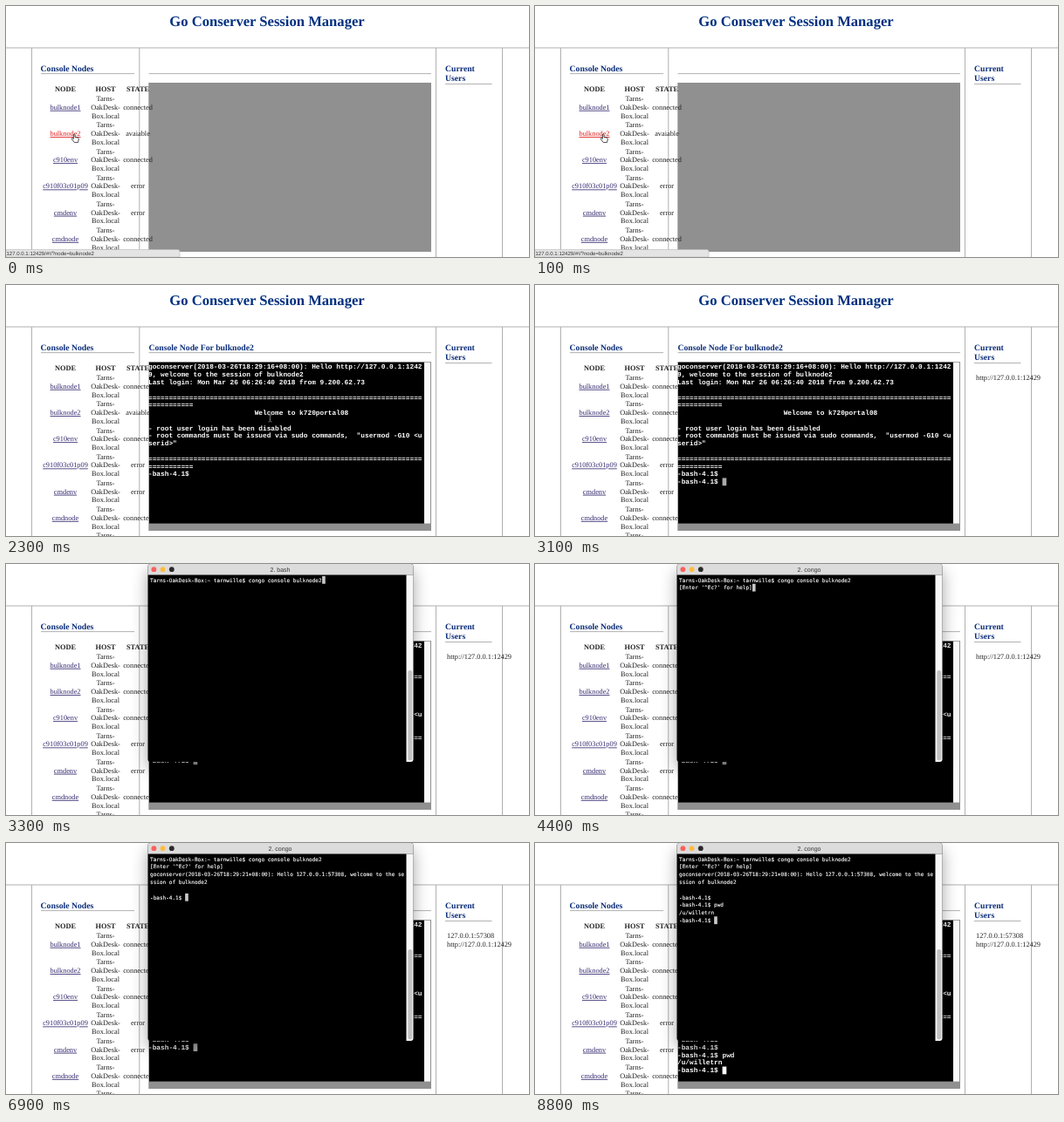
An HTML page that plays this animation: 599 px wide and 288 px high, repeating every 8900 ms.

```html
<!DOCTYPE html>
<html lang="en">
<head>
<meta charset="utf-8">
<title>Go Conserver Session Manager</title>
<style>
  html, body { margin: 0; width: 100%; height: 100%; overflow: hidden; background: #fff; }
  svg { display: block; width: 599px; height: 288px; }
  text { white-space: pre; text-rendering: geometricPrecision; }
  .page { font: 8.3px "Liberation Serif", serif; fill: #222; }
  .bold { font-weight: bold; }
  .head { font: bold 9.72px "Liberation Serif", serif; fill: #0a2c78; }
  .title { font: bold 16.63px "Liberation Serif", serif; fill: #003080; }
  .link { fill: #35296f; text-decoration: underline; }
  .web { font: bold 7.815px "Liberation Mono", monospace; fill: #fff; }
  .tty { font: 6.06px "DejaVu Sans Mono", monospace; fill: #fff; stroke: #fff; stroke-width: .12px; }
  .ui { font: 6.05px "Liberation Sans", sans-serif; fill: #333; }
  .mid { text-anchor: middle; }
  .win { filter: drop-shadow(0 8px 9px rgba(0, 0, 0, .36)); }
</style>
</head>
<body>
<script>
const LOOP = 8900;
const NS = "http://www.w3.org/2000/svg";

function add(parent, tag, attrs = {}, text) {
  const el = document.createElementNS(NS, tag);
  for (const k in attrs) el.setAttribute(k, attrs[k]);
  if (text !== undefined) el.textContent = text;
  parent.append(el);
  return el;
}
const rect = (p, x, y, width, height, fill) => add(p, "rect", { x, y, width, height, fill });
const label = (p, cls, x, y, s) => add(p, "text", { class: cls, x, y }, s);
const group = (p, cls = "") => add(p, "g", { class: cls });
const show = (el, on) => el.setAttribute("visibility", on ? "visible" : "hidden");

const svg = add(document.body, "svg", { viewBox: "0 0 599 288" });
rect(svg, 0, 0, 599, 288, "#fff");

// Page frame
rect(svg, 0, 47.5, 599, 1, "#b0b0b0");
for (const x of [29, 152.3, 492, 568]) rect(svg, x, 48, 1, 240, "#b0b0b0");
label(svg, "title mid", 299, 23, "Go Conserver Session Manager");
label(svg, "head", 39.6, 75, "Console Nodes");
const nodeHead = label(svg, "head", 163.4, 75, "Console Node For bulknode2");
label(svg, "head", 503, 75, "Current");
label(svg, "head", 503, 86.3, "Users");
rect(svg, 40, 77.2, 107, 0.9, "#aaa");
rect(svg, 163.5, 77.2, 323.5, 0.9, "#aaa");
rect(svg, 503, 89, 53.5, 0.9, "#aaa");
rect(svg, 163.3, 88, 323.7, 194, "#909090");

// Node table
[["NODE", 68], ["HOST", 114], ["STATE", 151]].forEach(([s, x]) => label(svg, "page bold mid", x, 98, s));
const rows = [
  ["bulknode1", "connected"], ["bulknode2", "avaiable"], ["c910env", "connected"],
  ["c910f03c01p09", "error"], ["cmdenv", "error"], ["cmdnode", "connected"], ["", ""]
].map(([name, state], i) => {
  const y = 118.8 + i * 30.22;
  ["Tarns-", "OakDesk-", "Box.local"].forEach((s, k) => label(svg, "page mid", 114, y + (k - 1) * 9.7, s));
  return {
    link: label(svg, "page link mid", 68, y, name),
    state: label(svg, "page mid", 151, y, state)
  };
});
const users = [109, 119.2].map(y => label(svg, "page", 505, y, ""));

// Browser console
const consoleBox = group(svg);
rect(consoleBox, 164, 88.8, 315, 184.8, "#000");
rect(consoleBox, 479, 88.8, 7, 184.8, "#fafafa");

// Rows of text plus a block cursor; log entries are [time, line, text]
function terminal(parent, cls, x, y, pitch, cw, log, cursorFrom) {
  const count = Math.max(...log.map(e => e[1])) + 1;
  const cursor = rect(parent, 0, 0, cw, pitch, "#c8c8c8");
  const lines = Array.from({ length: count }, (_, i) => label(parent, cls, x, y + i * pitch, ""));
  return t => {
    const now = Array(count).fill("");
    let last = 0;
    for (const [at, n, s] of log) if (t >= at) {
      now[n] = s;
      last = n;
    }
    now.forEach((s, i) => { if (lines[i].textContent !== s) lines[i].textContent = s; });
    cursor.setAttribute("x", x + now[last].length * cw);
    cursor.setAttribute("y", y + last * pitch - pitch * 0.76);
    show(cursor, t >= cursorFrom);
    return cursor;
  };
}

const PROMPT = "-bash-4.1$ ";
const shell = n => [
  [6400, n, PROMPT], [7200, n + 1, PROMPT],
  [7500, n + 1, PROMPT + "p"], [7700, n + 1, PROMPT + "pw"], [7900, n + 1, PROMPT + "pwd"],
  [8400, n + 2, "/u/willetrn"], [8400, n + 3, PROMPT]
];
const webLog = [
  [1500, 0, "goconserver(2018-03-26T18:29:16+08:00): Hello http://127.0.0.1:1242"],
  [1500, 1, "9, welcome to the session of bulknode2"],
  [1800, 2, "Last login: Mon Mar 26 06:26:40 2018 from 9.200.62.73"],
  [1800, 4, "=".repeat(67)],
  [1800, 5, "=".repeat(11)],
  [1800, 6, " ".repeat(26) + "Welcome to k720portal08"],
  [1800, 8, "- root user login has been disabled"],
  [1800, 9, "- root commands must be issued via sudo commands,  \"usermod -G10 <u"],
  [1800, 10, "serid>\""],
  [1800, 12, "=".repeat(67)],
  [1800, 13, "=".repeat(11)],
  [1900, 14, PROMPT], [2600, 15, PROMPT],
  ...shell(16)
];
const ttyLog = [
  [3300, 0, "Tarns-OakDesk-Box:~ tarnwille$ congo console bulknode2"],
  [4400, 1, "[Enter '^Ec?' for help]"],
  [4600, 2, "goconserver(2018-03-26T18:29:21+08:00): Hello 127.0.0.1:57308, welcome to the se"],
  [4600, 3, "ssion of bulknode2"],
  [4600, 4, ""],
  ...shell(5)
];
const drawWeb = terminal(consoleBox, "web", 163, 96.4, 8.78, 4.69, webLog, 2600);

// Desktop terminal window
const win = group(svg);
const frame = group(win, "win");
add(frame, "path", { d: "M162.5 3q0-3 3-3h298q3 0 3 3v221q0 3-3 3h-298q-3 0-3-3z", fill: "#000" });
add(win, "path", { d: "M162.5 12.5V3q0-3 3-3h298q3 0 3 3v9.5z", fill: "#dcdcdc" });
add(win, "path", { d: "M458.5 12.5h8v211.5q0 3-3 3h-5z", fill: "#f7f7f7" });
add(win, "rect", { x: 460.3, y: 122, width: 5, height: 103.5, rx: 2.5, fill: "#c2c2c2" });
["#fc605b", "#fdbc40", "#2a2a2a"].forEach((fill, i) => add(win, "circle", { cx: 169.4 + i * 10.2, cy: 6.2, r: 2.9, fill }));
const winTitle = label(win, "ui mid", 314, 8.6, "2. bash");
winTitle.style.fontSize = "7px";
const drawTty = terminal(win, "tty", 165, 20.6, 8.8, 3.65, ttyLog, 3300);

// Link preview bar
const status = group(svg);
add(status, "path", { d: "M0 279.5h196.5q2.5 0 2.5 2.5v6H0z", fill: "#e4e4e4", stroke: "#bbb", "stroke-width": 0.6 });
label(status, "ui", 0.5, 286, "127.0.0.1:12429/#!/?node=bulknode2");

// Pointers
const hand = add(svg, "path", {
  d: "M-1.6-4.6q.9-.9 1.6 0v3l3.4.8q1.1.4.9 1.6l-.8 3.8h-4.2l-3-4q-.3-1.2.9-1l1.2.8z",
  fill: "#fff", stroke: "#222", "stroke-width": 0.8
});
const beam = add(svg, "path", {
  d: "M-2-4Q0-4 0-3Q0-4 2-4M-2 4Q0 4 0 3Q0 4 2 4M0-3V3M-1 1H1", fill: "none", "stroke-width": 0.9
});

const ease = p => p * p * (3 - 2 * p);

function render(t) {
  const p = ease(Math.min(1, Math.max(0, (t - 400) / 500)));
  const x = t < 3300 ? 79 + 223.5 * p : 350.7;
  const y = t < 3300 ? 152 + p : 86.3;
  const onLink = x < 86;
  for (const el of [hand, beam]) el.setAttribute("transform", `translate(${x} ${y})`);
  show(hand, t < 2600 && onLink);
  show(beam, !onLink && t < 2600 || t >= 4800 && t < 6000);
  beam.setAttribute("stroke", t < 3300 ? "#777" : "#ccc");

  show(status, onLink);
  rows[1].link.style.fill = onLink ? "#e01818" : "";
  rows[1].state.textContent = t < 2800 ? "avaiable" : "connected";
  show(nodeHead, t >= 300);
  consoleBox.style.display = t >= 300 ? "" : "none";
  win.style.display = t >= 3300 ? "" : "none";
  winTitle.textContent = t < 4400 ? "2. bash" : "2. congo";

  const web = "http://127.0.0.1:12429";
  users[0].textContent = t < 2800 ? "" : t < 5100 ? web : "127.0.0.1:57308";
  users[1].textContent = t < 5100 ? "" : web;

  drawWeb(t).setAttribute("fill", t < 8400 ? "#aaa" : "#fff");
  drawTty(t);
}

const start = performance.now();
function tick() {
  render((performance.now() - start) % LOOP);
  requestAnimationFrame(tick);
}
render(0);
requestAnimationFrame(tick);
</script>
</body>
</html>
```
